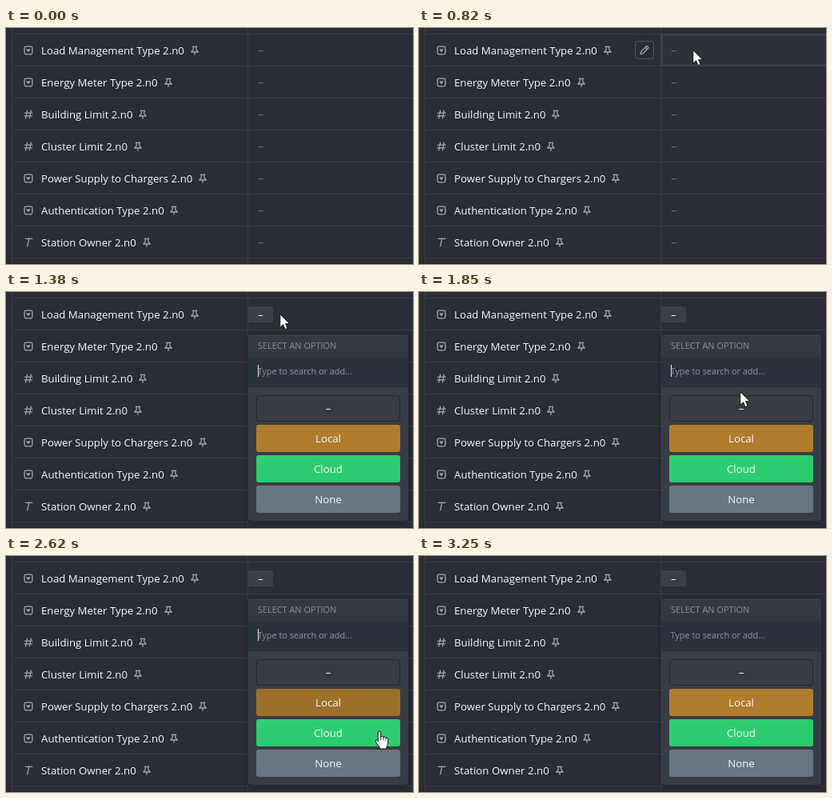
An HTML page that plays this animation: 509 by 295 pixels, repeating every 3520 ms.

```html
<!DOCTYPE html>
<html lang="en">
<head>
<meta charset="utf-8">
<title>Select an option</title>
<style>
  html, body { margin: 0; width: 100%; height: 100%; overflow: hidden; background: #2a2d35; }
  svg { display: block; width: 509px; height: 295px; font: 13.25px "Open Sans", "Noto Sans", sans-serif; }
  .label { fill: #f6f7f9; }
  .small { font-size: 10.9px; }
  .dash { font-size: 14px; fill: #6c717a; }
  .line { fill: #3a3e47; }
  .icon { fill: none; stroke: #a1a6ae; stroke-width: 1.3; stroke-linejoin: round; stroke-linecap: round; }
  .solid { fill: #a1a6ae; stroke: none; }
</style>
</head>
<body>
<svg viewBox="0 0 509 295">
  <defs>
    <filter id="shadow" x="-10%" y="-10%" width="120%" height="120%">
      <feDropShadow dx="0" dy="1" stdDeviation="3" flood-color="#15171b" flood-opacity=".5"/>
    </filter>
    <g id="select" class="icon">
      <rect x="-4.9" y="-4.9" width="9.8" height="9.8" rx="1.8"/>
      <path class="solid" d="M-3-1.4H3L0 2.2Z"/>
    </g>
    <path id="number" class="icon" d="M-1.3-4.8L-3.3 4.8M3.3-4.8L1.3 4.8M-4.6-1.8H5M-5 1.8H4.6"/>
    <path id="text" class="icon" d="M-3.8-4.7H5M.7-4.7L-1.3 4.8"/>
    <path id="pin" class="icon" d="M-2.7-4.7H2.7M-1.8-4.7V-.8L-4.2 2H4.2L1.8-.8V-4.7M0 2V5.3"/>
    <g id="pencil">
      <rect x="-11.5" y="-11.5" width="23" height="22" rx="3" fill="#2a2d35" stroke="#535861"/>
      <path class="icon" d="M-4.9 4.6L-4.2 1.4L2.2-5Q3.2-5.6 4.2-4.6T4.6-2.6L-1.8 3.8ZM.9-3.7L3.3-1.3"/>
    </g>
    <path id="arrow" d="M.8.8V17.3L4.6 13.7L7.1 19.6L10 18.4L7.5 12.6H12.7Z"
      fill="#fff" stroke="#111" stroke-width=".9" stroke-linejoin="round"/>
    <g id="hand" stroke-linejoin="round" stroke-linecap="round" stroke="#111">
      <path fill="#fff" d="M-1.8 1.5Q-1.6 0 0 0T1.8 1.5V7Q3.4 5.8 5 7.4Q6.7 6.5 8 8.2Q10.6 7.6 10.8 10V15Q10.8 17.5 9 19.5V22H.2V19.8Q-2 17.6-4.5 13.2Q-5.2 11.2-3.8 10.9Q-2.8 10.9-1.8 12.6Z"/>
      <path fill="none" stroke-width=".9" d="M1.8 7V11M5 7.6V11M8 8.4V11.2"/>
    </g>
  </defs>
  <g id="table"></g>
  <g id="hover">
    <rect x="303.5" y="8.5" width="210" height="38" fill="#30353e" stroke="#4c515b"/>
    <text class="dash" x="315" y="33">–</text>
  </g>
  <use id="edit" href="#pencil"/>
  <g id="menu">
    <rect x="303" y="18" width="31" height="20" fill="#3a3f48"/>
    <text class="label" x="315" y="33">–</text>
    <rect x="303" y="53" width="200" height="233" rx="4" fill="#373d45" filter="url(#shadow)"/>
    <path d="M303 81V57Q303 53 307 53H499Q503 53 503 57V81Z" fill="#343a42"/>
    <rect x="303" y="81" width="200" height="38" fill="#2a333b"/>
    <rect x="303" y="118" width="200" height="1" fill="#242a31"/>
    <text class="small" x="315" y="71" fill="#8b9199">SELECT AN OPTION</text>
    <text class="small" x="314.5" y="103" fill="#8d969e">Type to search or add...</text>
    <rect id="caret" x="315" y="91" width="1" height="15" fill="#e6e9ec"/>
    <g id="options"></g>
  </g>
  <use id="pointer"/>
</svg>
<script>
const LOOP = 3520, OPEN = 1380, BLINK = 530;
const $ = id => document.getElementById(id);

const rows = [
  ["select", "Load Management Type 2.n0", 236],
  ["select", "Energy Meter Type 2.n0", 203],
  ["number", "Building Limit 2.n0", 171],
  ["number", "Cluster Limit 2.n0", 165],
  ["select", "Power Supply to Chargers 2.n0", 246],
  ["select", "Authentication Type 2.n0", 210],
  ["text", "Station Owner 2.n0", 176]
];
const bar = (x, y, w, h) => `<rect class="line" x="${x}" y="${y}" width="${w}" height="${h}"/>`;

$("table").innerHTML =
  rows.map(([icon, name, pinX], i) => {
    const y = 28 + 40 * i;
    return bar(7, y - 21, 502, 1) +
      `<use href="#${icon}" x="28" y="${y}"/>
       <text class="label" x="44" y="${y + 5}">${name}</text>
       <use href="#pin" x="${pinX}" y="${y}"/>
       <text class="dash" x="315" y="${y + 5}">–</text>`;
  }).join("") +
  bar(7, 287, 502, 1) + bar(7, 0, 1, 294) + bar(302, 0, 1, 294) +
  `<rect y="294" width="509" height="1" fill="#202329"/>`;

// label, colour, hovered colour
const options = [
  ["–", "#373c44", "#31363d"],
  ["Local", "#b07d2e", "#9d702a"],
  ["Cloud", "#2ecc71", "#2bbc68"],
  ["None", "#677685", "#5d6a78"]
];
$("options").innerHTML = options.map(([name], i) => {
  const y = 128 + 38 * i;
  const shape = i ? `<rect x="313" y="${y}" width="180" height="34" rx="3"/>`
    : `<rect x="313.5" y="129.5" width="179" height="32" rx="3" stroke="#22252b"/>`;
  return shape + `<text class="label" x="403" y="${y + 22}" text-anchor="middle">${name}</text>`;
}).join("");
const buttons = [...$("options").querySelectorAll("rect")];

// start time, x, y, shape; the pointer is hidden where x is missing
const moves = [
  [0], [260, 490, 280, "arrow"], [330, 345, 215, "arrow"], [400, 235, 145, "arrow"],
  [470, 228, 76, "arrow"], [540, 269, 45, "arrow"], [610, 303, 36, "arrow"],
  [680, 321, 34, "arrow"], [750, 329, 33, "arrow"], [820, 342, 27, "arrow"],
  [1640, 346, 33, "arrow"], [1710, 358, 54, "arrow"], [1780, 378, 88, "arrow"],
  [1850, 401, 124, "arrow"], [1920, 422, 160, "hand"], [1990, 439, 189, "hand"],
  [2060, 450, 209, "hand"], [2130, 456, 218, "hand"], [2200, 457, 219, "hand"],
  [2270, 459, 226, "hand"], [2340, 461, 222, "hand"], [2410, 463, 208, "hand"],
  [2480, 465, 192, "hand"], [2550, 466, 199, "hand"], [2620, 467, 219, "hand"],
  [2690, 468, 236, "hand"], [2760, 469, 244, "hand"], [2830, 470, 253, "hand"],
  [2900, 471, 262, "hand"], [2970, 472, 271, "hand"], [3040, 473, 283, "arrow"],
  [3110]
];
// start time, row with the edit button, row with the lit cell
const rowHover = [[0, -1, -1], [330, -1, 5], [400, 3, -1], [470, 2, -1], [540, 1, -1],
  [610, 0, -1], [680, 0, 0], [OPEN, -1, -1]];
// start time, darkened option
const optionHover = [[0, -1], [1920, 0], [1990, 1], [2130, 2], [2480, 1], [2690, 2], [2830, 3], [3250, -1]];

const at = (steps, t) => steps.findLast(s => s[0] <= t);
const show = (el, on) => el.style.display = on ? "" : "none";

function draw(t) {
  const [, x, y, shape] = at(moves, t);
  show($("pointer"), shape);
  if (shape) {
    $("pointer").setAttribute("href", "#" + shape);
    $("pointer").setAttribute("transform", `translate(${x} ${y})`);
  }

  const [, editRow, litRow] = at(rowHover, t);
  show($("edit"), editRow >= 0);
  $("edit").setAttribute("transform", `translate(282 ${28 + 40 * editRow})`);
  show($("hover"), litRow >= 0);
  $("hover").setAttribute("transform", `translate(0 ${40 * litRow})`);
  $("hover").setAttribute("opacity", t < 1170 ? .75 : 1);

  show($("menu"), t >= OPEN);
  show($("caret"), Math.floor((t - OPEN) / BLINK) % 2 === 0);
  const dark = at(optionHover, t)[1];
  buttons.forEach((b, i) => b.setAttribute("fill", options[i][i === dark ? 2 : 1]));
}

const start = performance.now();
function tick() {
  draw((performance.now() - start) % LOOP);
  requestAnimationFrame(tick);
}
tick();
</script>
</body>
</html>
```
